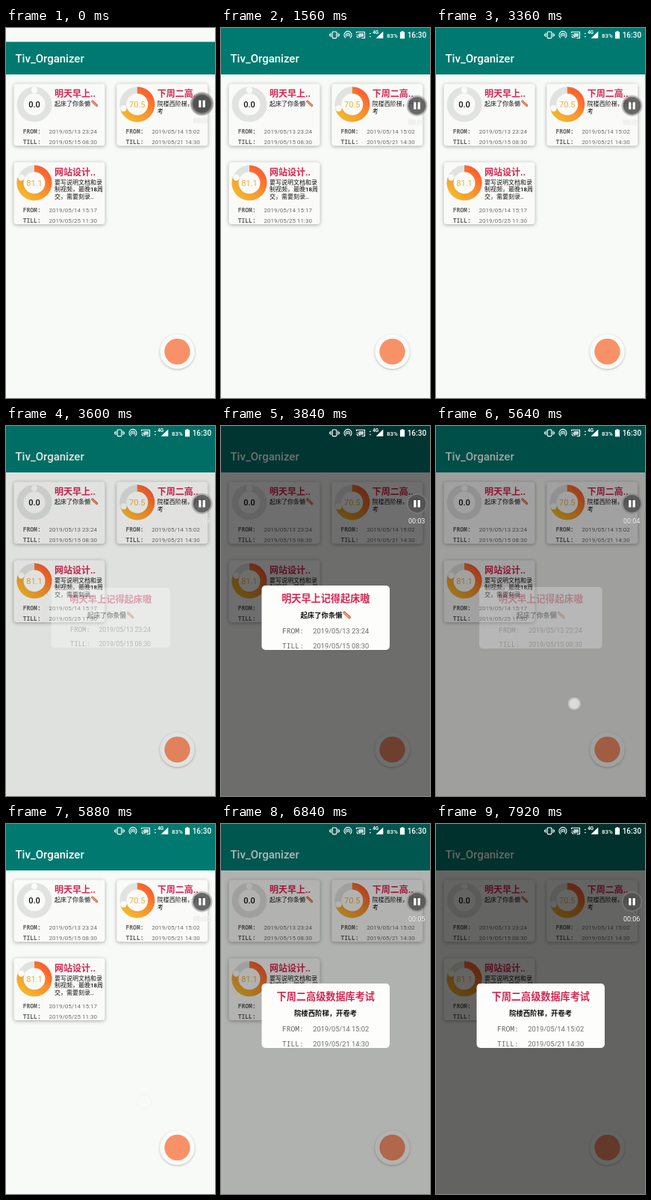
An HTML page for the animation above (8 s loop, 280x494 px).

```html
<!DOCTYPE html>
<html lang="zh-CN">
<head>
<meta charset="utf-8">
<title>Reminder cards</title>
<style>
html, body { margin: 0; width: 100%; height: 100%; overflow: hidden; background: #f8faf7; }
svg { display: block; width: 100vw; height: 100vh; font-family: Roboto, "Noto Sans CJK SC", "Noto Sans CJK JP", sans-serif; }
.card { filter: drop-shadow(0 1.5px 2.5px rgba(0,0,0,.33)); }
.fab { filter: drop-shadow(0 1px 1.8px rgba(0,0,0,.25)); }
.title { fill: #d92550; font-weight: 700; font-size: 12px; }
.note { fill: #111; font-weight: 500; font-size: 8px; }
.label { fill: #606360; font: 700 8px "Noto Sans Mono", monospace; }
.date { fill: #6c6f6c; font-size: 8px; }
.dialog .title { font-size: 13.15px; }
.dialog .note { font-size: 9.35px; font-weight: 700; }
.dialog .label { font-size: 9.6px; font-weight: 500; }
.dialog .date { font-size: 9.3px; }
.mid { text-anchor: middle; }

.bar, .dim, .dialog, .touch { animation: 8s step-end infinite; }
.bar { animation-name: bar; }
.dim { animation-name: dim; }
.touch { animation-name: touch; }
.dialog { transform-origin: 140px 256px; }
#first { animation-name: first; }
#second { animation-name: second; }
.recorder { animation: settle 8s linear infinite; }
.halo { animation: halo 8s linear infinite; }

@keyframes bar { 0% { opacity: 0; } 1.5%, 100% { opacity: 1; } }
@keyframes dim {
  0% { opacity: 0; } 45% { opacity: .1; } 46.5% { opacity: .38; } 48% { opacity: .56; } 49.5% { opacity: .6; }
  70.5% { opacity: .36; } 72% { opacity: .1; } 73.5% { opacity: 0; }
  84% { opacity: .07; } 85.5% { opacity: .29; } 87% { opacity: .52; } 88.5%, 100% { opacity: .6; }
}
@keyframes first {
  0% { opacity: 0; } 45% { opacity: .35; transform: scale(.93); } 46.5% { opacity: .95; transform: scale(.985); }
  48% { opacity: 1; transform: none; } 70.5% { opacity: .25; transform: scale(.96); } 72%, 100% { opacity: 0; }
}
@keyframes second {
  0% { opacity: 0; } 84% { opacity: .4; transform: scale(.94); } 85.5%, 100% { opacity: 1; transform: none; }
}
@keyframes touch {
  0% { opacity: 0; } 66% { opacity: .6; } 67.5% { opacity: 1; } 70.5% { opacity: .75; }
  72% { opacity: .45; } 73.5% { opacity: .13; } 75%, 100% { opacity: 0; }
}
@keyframes settle { 0%, 1.5% { transform: translateY(-2.5px); } 6%, 100% { transform: none; } }
@keyframes halo { 0%, 1.5% { opacity: 1; } 7%, 100% { opacity: 0; } }
</style>
</head>
<body>
<svg viewBox="0 0 280 494" preserveAspectRatio="none">
  <defs>
    <linearGradient id="heat" x1="22" y1="120" x2="54" y2="84" gradientUnits="userSpaceOnUse">
      <stop offset="0" stop-color="#f4b92c"/><stop offset=".5" stop-color="#f9922d"/><stop offset="1" stop-color="#ff5a30"/>
    </linearGradient>
    <clipPath id="edge"><rect x="10.5" y="74.5" width="122" height="82.7" rx="4"/></clipPath>
    <clipPath id="sheet"><rect x="54.5" y="213" width="171.5" height="86" rx="5"/></clipPath>
    <g id="snack" stroke-linecap="round" fill="none">
      <path d="M1.5 1.5L7.5 7" stroke="#d9714f" stroke-width="3.2"/>
      <path d="M1.3 2.2Q3 2 4 4T7 6.8" stroke="#f4bc8e" stroke-width=".9"/>
    </g>
  </defs>

  <rect width="280" height="494" fill="#f8faf7"/>
  <rect class="bar" width="280" height="19" fill="#007a70"/>
  <rect y="18.5" width="280" height="43.5" fill="#007a70"/>
  <text x="12.5" y="46" font-size="15" font-weight="500" fill="#fff">Tiv_Organizer</text>

  <g id="cards"></g>

  <circle class="fab" cx="229.5" cy="432" r="23.3" fill="#fafbf9"/>
  <circle cx="229.5" cy="432" r="17.2" fill="#f99168"/>

  <rect class="dim" width="280" height="494"/>
  <g id="dialogs"></g>

  <g class="bar" fill="#fff">
    <g fill="none" stroke="#fff" stroke-width="1.1">
      <rect x="149.3" y="5" width="5.4" height="8.6" rx=".8"/>
      <path d="M147.3 6.5v5.6M156.7 6.5v5.6M145.6 7.8v3M158.4 7.8v3"/>
      <path d="M167 13.4a5 5 0 1 1 6 0M168.3 11.5a2.6 2.6 0 1 1 3.4 0"/>
      <path d="M181.5 7V5.2h11v8.3h-4M181.5 9a4.6 4.6 0 0 1 4.6 4.6M181.5 11.4a2.2 2.2 0 0 1 2.2 2.2"/>
    </g>
    <circle cx="170" cy="9.6" r="1.1"/>
    <rect x="184.5" y="7" width="6.5" height="4.8" opacity=".75"/>
    <path d="M198.6 8l1.3-1.6L201.2 8zM198.6 11l1.3 1.6 1.3-1.6zM207.5 13.8h9.8V4.5z"/>
    <text x="203.2" y="8" font-size="6.3" font-weight="700">4G</text>
    <text x="222" y="12.7" font-size="8" font-weight="500">83%</text>
    <path d="M239.9 5.3h1.7V4.2h2.8v1.1h1.7v8.9h-6.2z"/>
    <text x="249.7" y="13.2" font-size="10" font-weight="500">16:30</text>
  </g>

  <g class="recorder">
    <g class="halo">
      <circle cx="262.5" cy="103.7" r="15.5" fill="#777" opacity=".65"/>
      <circle cx="262.5" cy="103.7" r="13" fill="#444" opacity=".7"/>
    </g>
    <circle cx="262.5" cy="103.7" r="14" fill="#808080" opacity=".5"/>
    <circle cx="262.5" cy="103.7" r="11.8" fill="#464646" opacity=".72"/>
    <path d="M258.2 99h3.2v9.4h-3.2zM263.6 99h3.2v9.4h-3.2z" fill="#fff"/>
    <text id="clock" class="mid" x="262.2" y="129.7" font-size="9" fill="#fff" style="text-shadow:0 0 1px rgba(0,0,0,.28)">00:00</text>
  </g>

  <g class="touch">
    <circle cx="185.3" cy="370.7" r="9.3" fill="#fff" fill-opacity=".4" stroke="#777" stroke-opacity=".45" stroke-width=".8"/>
    <circle cx="185.3" cy="370.7" r="6.8" fill="#fff" fill-opacity=".72"/>
  </g>
</svg>
<script>
const byId = id => document.getElementById(id);
const text = (cls, x, y, s) => `<text class="${cls}" x="${x}" y="${y}">${s}</text>`;
const snack = (x, y, k) => `<use href="#snack" transform="translate(${x} ${y}) scale(${k})"/>`;
const span = (x, y, gap, step, from, till) =>
  text('label', x, y, 'FROM:') + text('date', x + gap, y, from) +
  text('label', x, y + step, 'TILL:') + text('date', x + gap, y + step, till);

function ring(value) {
  const r = 19, angle = value / 100 * 2 * Math.PI;
  const endX = 38 + r * Math.sin(angle), endY = 102 - r * Math.cos(angle);
  const large = value > 50 ? 1 : 0;
  return `<g fill="none" stroke-width="9">
      <circle cx="38" cy="102" r="${r}" stroke="#e1e3e0"/>
      <path d="M38 ${102 - r}A${r} ${r} 0 ${large} 1 ${endX} ${endY}" stroke="url(#heat)"/>
    </g>
    <circle cx="${endX}" cy="${endY}" r="4.2" fill="#fafbf9"/>
    <text class="mid" x="38" y="106" font-size="11" font-weight="${value ? 400 : 500}"
      fill="${value ? '#efb13a' : '#111'}">${value.toFixed(1)}</text>`;
}

const card = ({ x, y, value, title, lines, from, till, extra = '' }) => `
  <g transform="translate(${x} ${y})">
    <rect class="card" x="10.5" y="74.5" width="122" height="82.7" rx="4" fill="#fafbf9"/>
    <g clip-path="url(#edge)">
      ${ring(value)}
      ${text('title', 65, 92, title)}
      ${lines.map((s, i) => text('note', 65, 104 + i * 9.6, s)).join('')}
      ${extra}
      ${span(22.7, 141, 34.8, 14, from, till)}
    </g>
  </g>`;

const dialog = ({ id, title, note, noteX, from, till, extra = '' }) => `
  <g class="dialog" id="${id}">
    <rect x="54.5" y="213" width="171.5" height="86" rx="5" fill="#fdfefc"/>
    <g clip-path="url(#sheet)">
      ${text('title mid', 140.3, 234.5, title)}
      ${text('note', noteX, 256, note)}
      ${extra}
      ${span(82, 276.5, 41.3, 20.3, from, till)}
    </g>
  </g>`;

const wake = { from: '2019/05/13 23:24', till: '2019/05/15 08:30' };
const exam = { from: '2019/05/14 15:02', till: '2019/05/21 14:30' };

byId('cards').innerHTML = [
  { x: 0, y: 0, value: 0, title: '明天早上..', lines: ['起床了你条懒'], extra: snack(114.2, 96.5, 1), ...wake },
  { x: 137.8, y: 0, value: 70.5, title: '下周二高..', lines: ['院楼西阶梯，开卷', '考'], ...exam },
  { x: 0, y: 104.8, value: 81.1, title: '网站设计..', lines: ['要写说明文档和录', '制视频，最晚18周', '交，需要刻录..'],
    from: '2019/05/14 15:17', till: '2019/05/25 11:30' }
].map(card).join('');

byId('dialogs').innerHTML = [
  { id: 'first', title: '明天早上记得起床嗷', note: '起床了你条懒', noteX: 106.5, extra: snack(163.5, 247.5, 1.15), ...wake },
  { id: 'second', title: '下周二高级数据库考试', note: '院楼西阶梯，开卷考', noteX: 98, ...exam }
].map(dialog).join('');

const start = performance.now();
function tick() {
  const time = (performance.now() - start) % 8000;
  byId('clock').textContent = '00:0' + Math.floor(time / 1200);
  requestAnimationFrame(tick);
}
tick();
</script>
</body>
</html>
```
